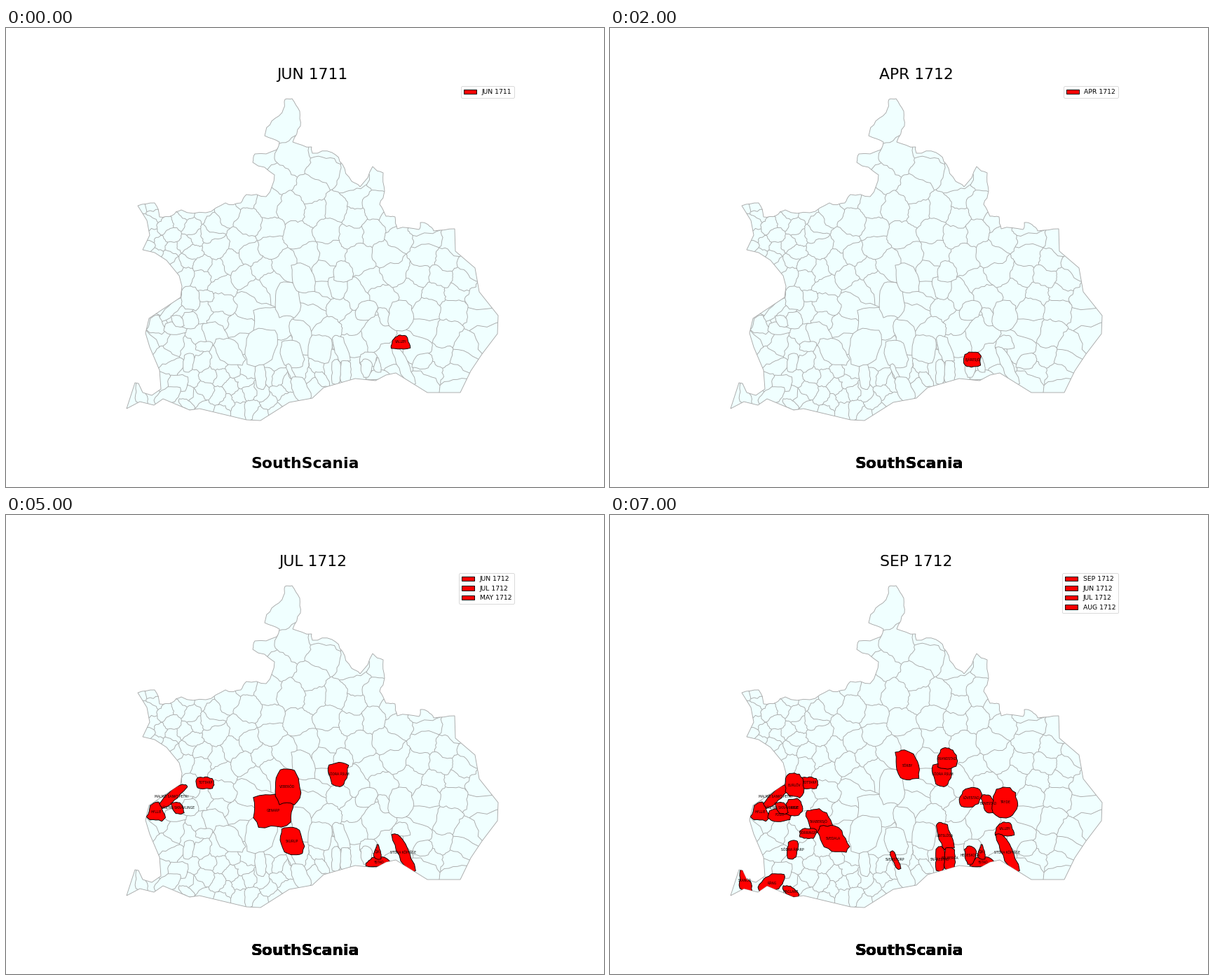
Write a matplotlib script that moves like this. It is 853 px wide and 656 px high and loops after 8 s.

```python
import numpy as np
import matplotlib.pyplot as plt
from matplotlib.animation import FuncAnimation
from matplotlib.collections import LineCollection
from matplotlib.patches import Patch, Polygon
from matplotlib.path import Path
from matplotlib.tri import Triangulation

W, H, DPI = 853, 656, 64
PT = 1.025  # point size at this resolution
GRAY, PALE = "darkgray", "azure"
rng = np.random.default_rng(1712)

# month shown, legend rows
STATES = [
    ("JUN 1711", ["JUN 1711"]),
    ("JUL 1711", ["JUN 1711"]),
    ("APR 1712", ["APR 1712"]),
    ("MAY 1712", ["MAY 1712", "APR 1712"]),
    ("JUN 1712", ["JUN 1712", "MAY 1712"]),
    ("JUL 1712", ["JUN 1712", "JUL 1712", "MAY 1712"]),
    ("AUG 1712", ["JUN 1712", "AUG 1712", "JUL 1712", "MAY 1712"]),
    ("SEP 1712", ["SEP 1712", "JUN 1712", "JUL 1712", "AUG 1712"]),
]


def rough(pts, amp, rounds):
    """Add irregular midpoints to a line."""
    for _ in range(rounds):
        step = np.diff(pts, axis=0)
        size = np.hypot(*step.T)[:, None] + 1e-9
        shift = rng.uniform(-amp, amp, size.shape) * np.minimum(1, 25 / size)
        out = np.empty((2 * len(pts) - 1, 2))
        out[::2] = pts
        out[1::2] = pts[:-1] + step / 2 + step[:, ::-1] * [-1, 1] * shift
        pts = out
    return pts


# key points of the inland border, east to west, then of the shore
border = np.array([
    (640, 287), (610, 290), (602, 281), (591, 278), (589, 288), (558, 287),
    (555, 270), (542, 269), (533, 252), (540, 233), (538, 207), (523, 198),
    (505, 227), (493, 219), (480, 195), (465, 178), (437, 179), (436, 170),
    (409, 163), (420, 140), (419, 119), (408, 101), (398, 102), (396, 115),
    (379, 133), (369, 154), (390, 163), (386, 174), (355, 180), (352, 192),
    (383, 210), (371, 241), (343, 238), (335, 250), (313, 250), (285, 264),
    (250, 260), (237, 268), (219, 270), (212, 250), (188, 254)], float)
shore = np.array([
    (201, 275), (205, 296), (195, 317), (212, 321), (229, 332), (247, 354),
    (251, 369), (249, 385), (204, 415), (199, 436), (205, 456), (219, 489),
    (221, 516), (208, 525), (195, 521), (189, 508), (184, 507), (172, 544),
    (191, 534), (211, 539), (224, 530), (262, 546), (276, 544), (343, 560),
    (363, 561), (404, 535), (437, 529), (453, 514), (498, 501), (527, 504),
    (542, 496), (556, 493), (601, 521), (648, 521), (663, 490), (679, 466),
    (701, 437), (702, 411), (675, 377), (669, 343), (641, 319)], float)
coast = np.vstack([rough(border, 0.12, 2), shore])

fig = plt.figure(figsize=(W / DPI, H / DPI), dpi=DPI, facecolor="white")
ax = fig.add_axes([0, 0, 1, 1])
ax.set(xlim=(0, W), ylim=(H, 0))
ax.axis("off")
land = ax.add_patch(Polygon(coast, fc=PALE, ec="none", zorder=0))
ax.add_patch(Polygon(coast, fc="none", ec=GRAY, lw=PT, zorder=3))

parishes = []


def parish(name, when, x, y, w, h, lean=0, taper=0):
    """An irregular block in a w by h box, red in the states listed in `when`.

    lean moves its foot to the right, taper narrows its top.
    """
    turn = np.linspace(0, 2 * np.pi, 12, endpoint=False) + rng.uniform(0, 0.5)
    c, s = np.cos(turn), np.sin(turn)
    r = (c ** 4 + s ** 4) ** -0.25 * rng.uniform(0.88, 1.06, len(turn))
    u, v = r * c, r * s
    u = u * (1 + taper * v) / (1 + abs(taper))
    u = u * (1 - abs(lean)) + lean * v
    pts = np.c_[x + u * w / 2, y + v * h / 2]
    edge = rough(np.vstack([pts, pts[:1]]), 0.12, 1)
    patch = ax.add_patch(Polygon(edge, lw=PT))
    patch.set_clip_path(land)
    label = ax.text(x, y, name, size=5 * PT, ha="center", va="center", zorder=6)
    parishes.append((patch, label, {int(i) for i in when}, edge))


parish("VALLBY", "017", 563, 449, 33, 20, taper=0.3)
parish("BJÄRESJÖ", "23", 517, 474, 24, 22)
parish("GENARP", "3456", 381, 422, 57, 50)
parish("VEBERÖD", "3456", 401, 389, 36, 50)
parish("SLIMMINGE", "34", 422, 442, 42, 54, lean=0.3)
parish("GRÖNBY", "34", 363, 498, 19, 36, lean=0.15)
parish("MALMÖ SANKT PETRI", "4567", 236, 403, 54, 35, lean=-0.65)
parish("YSTAD", "4567", 531, 496, 48, 15, taper=0.4)
parish("ÖJA", "4567", 530, 481, 15, 22, taper=0.8)
parish("STORA KÖPINGE", "567", 567, 482, 39, 55, lean=0.6)
parish("SKURUP", "5", 408, 466, 39, 41, lean=0.2)
parish("TOTTARP", "567", 284, 383, 25, 17)
parish("HYLLIE", "567", 214, 424, 31, 27, taper=0.4)
parish("FOSIE", "67", 242, 429, 34, 18)
parish("HUSIE", "67", 262, 418, 24, 26)
parish("VÄSTRA SKRÄVLINGE", "567", 245, 419, 22, 18, lean=0.3)
parish("SÖDRA ÅSUM", "567", 474, 371, 36, 33, taper=-0.3)
parish("BURLÖV", "67", 263, 386, 27, 36)
parish("SKABERSJÖ", "67", 298, 438, 48, 36, lean=0.3)
parish("BÖRRINGE", "6", 364, 456, 54, 53, lean=-0.2)
parish("SVEDALA", "67", 318, 463, 54, 40, lean=0.3)
parish("HÅSLÖV", "6", 245, 507, 30, 24)
parish("MAGLARP", "67", 258, 538, 29, 16, lean=0.4)
parish("SVENSTORP", "67", 407, 493, 20, 26, lean=0.6)
parish("ÖSTRA VEMMENHÖG", "6", 420, 516, 35, 35, lean=0.3)
parish("VILLIE", "6", 448, 458, 35, 41)
parish("KATSLÖSA", "67", 478, 459, 33, 40, lean=0.4)
parish("SOLBERGA", "67", 485, 491, 16, 34)
parish("SNÅRESTAD", "67", 471, 492, 14, 36)
parish("VÄSTRA NÖBBELÖV", "6", 451, 502, 28, 22, lean=0.4)
parish("BENESTAD", "67", 540, 413, 26, 25, lean=0.3)
parish("GLEMMINGE", "6", 594, 476, 34, 22, lean=-0.2)
parish("SÖRBY", "7", 424, 358, 39, 43, lean=0.2)
parish("BRANDSTAD", "7", 481, 348, 36, 30, taper=0.3)
parish("LÖVESTAD", "7", 515, 404, 38, 27, lean=-0.2)
parish("TRYDE", "7", 563, 411, 35, 42)
parish("TÖRRINGE", "7", 282, 455, 24, 15)
parish("SÖDRA ÅKARP", "7", 260, 479, 19, 28, lean=-0.2)
parish("SKANÖR", "7", 192, 523, 32, 32, lean=0.3, taper=0.6)
parish("RÄNG", "7", 231, 526, 46, 26, lean=-0.3)
parish("HEDESKOGA", "7", 514, 487, 19, 26, taper=-0.3)


def spacing(x, y):
    """Least distance between parish centres, across and down."""
    if y > 475 and x < 500:
        return 12, 20
    if x < 285 and y > 415:
        return 32, 10
    size = np.clip(14 + 0.09 * (x - 250), 14, 24) + 8 * (y < 240)
    return 1.2 * size, 0.85 * size


def scatter_centres():
    shape = Path(coast)
    named = [Path(edge) for *_, edge in parishes]
    corners = np.vstack([edge for *_, edge in parishes])
    seeds = [(408, 187, 30, 25), (397, 138, 30, 25)]
    for x, y in rng.uniform((170, 170), (705, 562), (8000, 2)):
        rx, ry = spacing(x, y)
        s = np.array(seeds)
        gap = np.hypot((s[:, 0] - x) / np.maximum(s[:, 2], rx),
                       (s[:, 1] - y) / np.maximum(s[:, 3], ry))
        if gap.min() < 1 or not shape.contains_point((x, y)):
            continue
        if np.hypot(*(corners - (x, y)).T).min() < 0.35 * min(rx, ry):
            continue
        if not any(p.contains_point((x, y)) for p in named):
            seeds.append((x, y, rx, ry))
    return np.array(seeds)[:, :2]


def borders(seeds):
    """Rough edges between the nearest-centre regions of the seeds."""
    turn = np.linspace(0, 2 * np.pi, 24, endpoint=False)
    ring = np.c_[430 + 900 * np.cos(turn), 330 + 900 * np.sin(turn)]
    pts = np.vstack([seeds, ring])
    mesh = Triangulation(*pts.T)
    a, b, c = (pts[mesh.triangles[:, k]] for k in range(3))
    u, v = b - a, c - a
    det = 2 * (u[:, 0] * v[:, 1] - u[:, 1] * v[:, 0])
    uu, vv = (u ** 2).sum(1), (v ** 2).sum(1)
    centre = a + np.c_[v[:, 1] * uu - u[:, 1] * vv,
                       u[:, 0] * vv - v[:, 0] * uu] / det[:, None]
    return [rough(centre[[t, n]], 0.2, 3)
            for t, row in enumerate(mesh.neighbors) for n in row if n > t]


lines = LineCollection(borders(scatter_centres()), colors=GRAY, lw=PT, zorder=1)
ax.add_collection(lines, autolim=False)
lines.set_clip_path(land)

title = ax.text(437.2, 73.2, "", size=24 * PT, ha="center", va="baseline")
# the caption is printed once more each month, so its edges grow darker
captions = [ax.text(W / 2, 629.3, "SouthScania", size=24 * PT, weight="bold",
                    ha="center", va="baseline") for _ in STATES]


def update(i):
    month, rows = STATES[i]
    title.set_text(month)
    for patch, label, when, _ in parishes:
        on = i in when
        patch.set(fc="red" if on else PALE, ec="black" if on else GRAY,
                  zorder=4 if on else 2)
        label.set_visible(on)
    for k, text in enumerate(captions):
        text.set_visible(k <= i)
    keys = [Patch(fc="red", ec="black", lw=PT, label=row) for row in rows]
    ax.legend(handles=keys, loc="upper right", bbox_to_anchor=(725, 83.3),
              bbox_transform=ax.transData, borderaxespad=0, fontsize=10.1 * PT)
    return []


anim = FuncAnimation(fig, update, frames=len(STATES), interval=1000, repeat=True)
plt.show()
```
